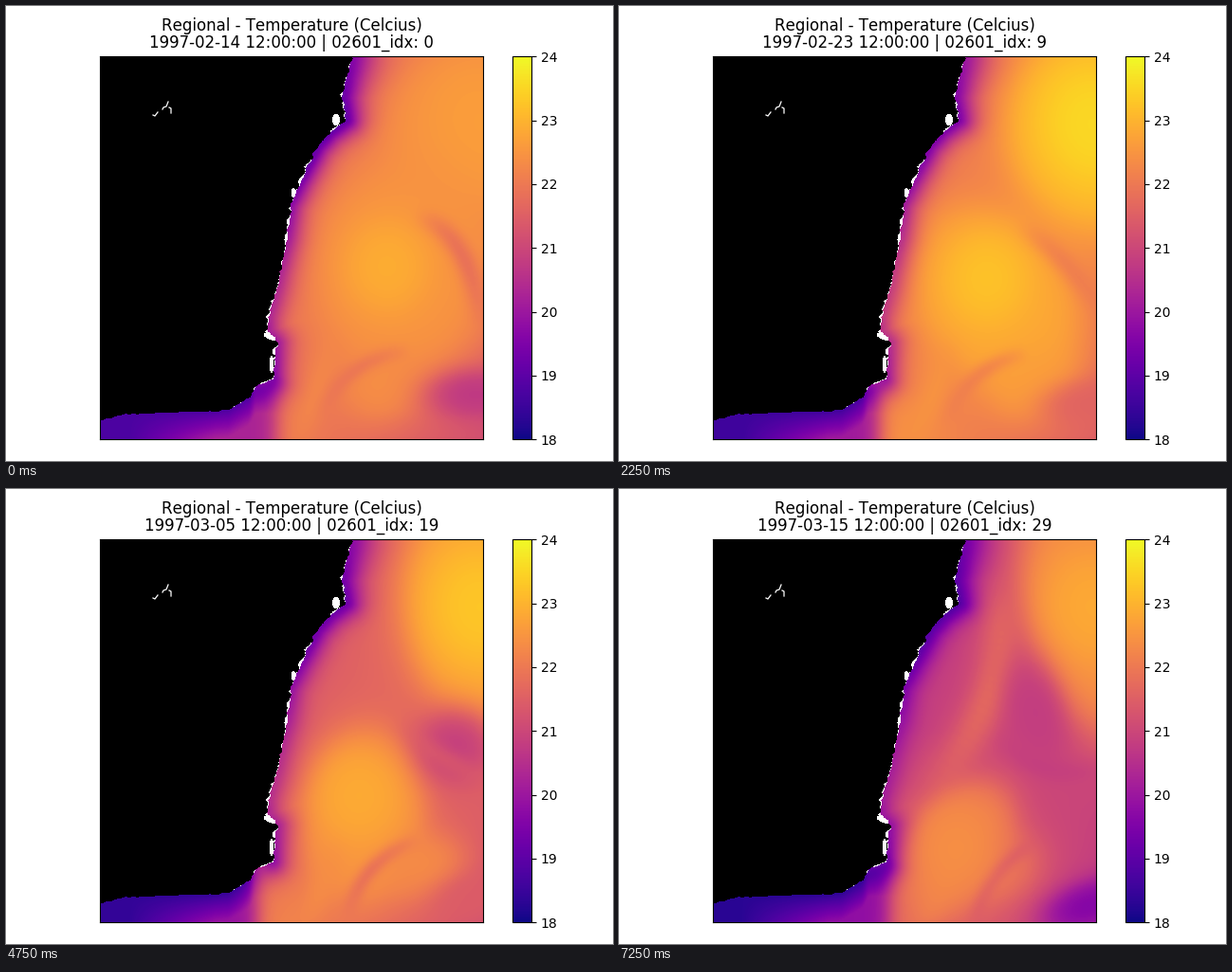
Animation of 640x480 px, one loop 7500 ms. Source, as a matplotlib script:

```python
import numpy as np
import matplotlib.pyplot as plt
from matplotlib.animation import FuncAnimation
from matplotlib.patches import Ellipse, Polygon

W, H, DPI = 640, 480, 100
FRAMES, INTERVAL = 30, 250
LEFT, RIGHT, TOP, BOTTOM = 99.2, 503.2, 53.2, 457.2

# Coastline in stage pixels: the east shore going south, then the south shore going west.
EAST = np.array([
    (365, 53), (358, 76), (354, 97), (358, 120), (341, 133), (328, 148), (310, 185),
    (299, 211), (296, 245), (285, 298), (276, 328), (276, 344), (285, 355), (281, 393)])
SOUTH = np.array([(263, 400), (257, 412), (235, 425), (218, 427), (125, 430), (99, 437)])


def walk(points, step):
    """Points along a polyline at an even spacing."""
    run = np.r_[0, np.cumsum(np.hypot(*np.diff(points, axis=0).T))]
    s = np.arange(0, run[-1], step)
    return np.interp(s, run, points[:, 0]), np.interp(s, run, points[:, 1])


N = 202
X, Y = np.meshgrid(LEFT + (np.arange(N) + 0.5) * (RIGHT - LEFT) / N,
                   TOP + (np.arange(N) + 0.5) * (BOTTOM - TOP) / N)
OFFSHORE = np.min([np.hypot(X - x, Y - y) for x, y in zip(*walk(EAST, 3))], axis=0)
BELOW = np.clip((Y - np.interp(X, SOUTH[::-1, 0], SOUTH[::-1, 1])) / 30, 0, 1)


def mix(a, b, amount):
    return a + (b - a) * amount


def blend(start, end, u):
    return mix(np.array(start, float), np.array(end, float), u)


def sigmoid(v):
    return 1 / (1 + np.exp(-np.clip(v, -40, 40)))


def smoothstep(v, low, high):
    t = np.clip((v - low) / (high - low), 0, 1)
    return t * t * (3 - 2 * t)


def eddy(temp, center, radii, tilt, value, soft=0.28, strength=1):
    c, s = np.cos(np.radians(tilt)), np.sin(np.radians(tilt))
    dx, dy = X - center[0], Y - center[1]
    q = np.hypot((dx * c + dy * s) / radii[0], (dy * c - dx * s) / radii[1])
    return mix(temp, value, strength * sigmoid((1 - q) / soft))


def filament(temp, points, width, value, strength=0.8):
    """A soft band along a quadratic Bezier curve, fading at its ends."""
    x0, y0, x1, y1, x2, y2 = points
    mask = np.zeros(X.shape)
    for t in np.linspace(0, 1, 26):
        a, b, c = (1 - t) ** 2, 2 * t * (1 - t), t * t
        near = np.hypot(X - a * x0 - b * x1 - c * x2, Y - a * y0 - b * y1 - c * y2)
        mask = np.maximum(mask, np.sin(np.pi * t) ** 0.5 * np.exp(-(near / width) ** 2))
    return mix(temp, value, strength * mask)


def open_water(u, warm):
    """Rows north / middle / south, each west and east, cooling at their own rates."""
    start = np.array([(21.7, 22.1), (22.0, 22.2), (22.1, 21.2)])
    cooling = np.array([(1.2, 0.3), (1.1, 1.2), (0.3, 0.4)])
    rows = start + 0.55 * warm - cooling * u
    level = [TOP, (TOP + BOTTOM) / 2, BOTTOM]
    west, east = (np.interp(Y, level, rows[:, k]) for k in (0, 1))
    return mix(west, east, np.clip((X - 300) / (RIGHT - 300), 0, 1))


def add_coast(temp, day, u, warm):
    shore = 19.7 + 0.65 * np.sin(2 * np.pi * (Y - 215) / 340) + 0.6 * warm - 0.2 * u
    width = 17 + 8 * np.exp(-((Y - 60) / 50) ** 2)
    temp = mix(temp, shore, np.exp(-(OFFSHORE / width) ** 1.6))

    pulse = np.exp(-((day - 4) / 3) ** 2)
    shelf = 18.6 + 0.9 * pulse - 0.3 * u + 1.5 * BELOW * np.clip((X - 130) / 90, 0, 1)
    front = 285 - 20 * np.sin(np.pi * u ** 1.5)
    return mix(temp, shelf, sigmoid((front - X) / 6) * sigmoid((Y - 397) / 4))


def temperature(day):
    u = day / (FRAMES - 1)
    warm = 0.8 * np.sin(np.pi * u ** 0.55)
    late = smoothstep(day, 11, 20)
    temp = open_water(u, warm)

    # Northern eddy and the warm tongue that later curls away from it.
    temp = eddy(temp, (500, 130), (100 - 30 * u, 95 + 35 * u), -12 * u,
                22.5 + 0.8 * warm - 0.1 * u, soft=0.14)
    temp = eddy(temp, (500, 125), (48, 56), -10, 22.65 + 1.05 * warm + 0.2 * u)
    temp = filament(temp, (395, 110, 425, 200, 335, 310), 22, 21.9,
                    0.8 * smoothstep(day, 17, 29))

    # Main eddy drifting south-west, with its trailing lobe.
    temp = eddy(temp, (418 - 62 * u, 280 + 100 * u), (92 - 42 * u, 118 - 40 * u),
                -35 * np.sin(5 * u), 22.5 + 0.55 * warm - 0.35 * u, soft=0.14)
    temp = eddy(temp, (400 + 45 * np.sin(np.pi * u), 400), (42, 34), -20,
                22.4 + 0.55 * warm - 0.5 * u)
    temp = filament(temp, blend((305, 457, 330, 405, 345, 350),
                                (320, 457, 345, 420, 350, 380), u),
                    16, 22.3 + 0.3 * warm - 0.1 * u)

    # Cold water entering from the east and the south-east corner.
    v = smoothstep(day, 14, 29)
    temp = eddy(temp, mix(np.array([485, 285]), np.array([440, 235]), v),
                (42 - 14 * v, 30 + 22 * v), -15 * v, 20.8, strength=late)
    temp = eddy(temp, (495, 410 + 30 * u), (46, 24), -20 * u,
                21.6 - 0.9 * np.exp(-day / 2) - 2 * u ** 6)
    temp = filament(temp, blend((440, 225, 490, 245, 500, 330),
                                (405, 265, 440, 310, 515, 295), u),
                    12, 21.5 + 0.8 * warm - 0.7 * u, 0.65)
    temp = filament(temp, blend((335, 430, 355, 375, 420, 365),
                                (375, 455, 390, 400, 435, 375), u),
                    9, 21.9 + 0.5 * warm - 0.7 * u)

    temp = eddy(temp, (402 - 45 * u, 275 + 105 * u ** 1.8), (40, 44), 0,
                22.9 + 0.6 * warm - 0.5 * u)
    return add_coast(temp, day, u, warm)


def title(day):
    month, date = (2, 14 + day) if day < 15 else (3, day - 14)
    return ("Regional - Temperature (Celcius)\n"
            f"1997-{month:02d}-{date:02d} 12:00:00 | 02601_idx: {day}")


def pixel_axes(left, top, width, height):
    return fig.add_axes([left / W, (H - top - height) / H, width / W, height / H])


def draw_land():
    rng = np.random.default_rng(4)
    x, y = walk(np.vstack([EAST, SOUTH]), 1.5)
    rough = np.convolve(rng.normal(size=len(x)), [0.4, 0.6, 0.4], "same")
    gap = np.convolve(rng.normal(size=len(x)), np.ones(4) / 2, "same")
    east = y < 396
    gap = np.clip(0.8 + 1.5 * gap, 0, 3.5) * np.clip((x - 235) / 40, 0, 1)
    x = x + 0.8 * rough * east
    y = y + 0.4 * rough * ~east
    x[0], x[-1] = 365, LEFT - 2

    def area(px, py, color):
        points = np.r_[np.c_[px, py], [(LEFT - 2, TOP - 2), (px[0], TOP - 2)]]
        ax.add_patch(Polygon(points, fc=color, ec="none", aa=False))

    area(x, y, "white")
    area(x - gap, y - 0.4 * gap * ~east, "black")

    # Bays, then the small inland lake.
    for cx, cy, w, h, tilt in [(348, 120, 7, 11, 0), (303, 197, 4, 9, 0),
                               (278, 349, 13, 4, 25), (280, 378, 3, 18, 0)]:
        ax.add_patch(Ellipse((cx, cy), w, h, angle=tilt, fc="white", ec="none", aa=False))
    for px, py in [((155, 157, 160), (115, 116, 112)),
                   ((165, 166, 169, 171), (109, 107, 106, 101)),
                   ((172, 174, 174), (107, 108, 113))]:
        ax.plot(px, py, color="white", lw=0.9)


# Whole-pixel kerning sets the heading slightly wider.
plt.rcParams["text.kerning_factor"] = 6
fig = plt.figure(figsize=(W / DPI, H / DPI), dpi=DPI, facecolor="white")
ax = pixel_axes(LEFT, TOP, RIGHT - LEFT, BOTTOM - TOP)
fields = [temperature(day) for day in range(FRAMES)]
image = ax.imshow(fields[0], cmap="plasma", vmin=18, vmax=24, aspect="auto",
                  interpolation="bilinear", extent=[LEFT, RIGHT, BOTTOM, TOP])
draw_land()
ax.set(xlim=(LEFT, RIGHT), ylim=(BOTTOM, TOP), xticks=[], yticks=[])
heading = ax.set_title(title(0), fontsize=12, pad=6.6, linespacing=1.0)
fig.colorbar(image, cax=pixel_axes(534.2, TOP, 20, BOTTOM - TOP), ticks=range(18, 25))


def draw(day):
    image.set_data(fields[day])
    heading.set_text(title(day))
    return image, heading


anim = FuncAnimation(fig, draw, frames=FRAMES, interval=INTERVAL, repeat=True)
plt.show()
```
